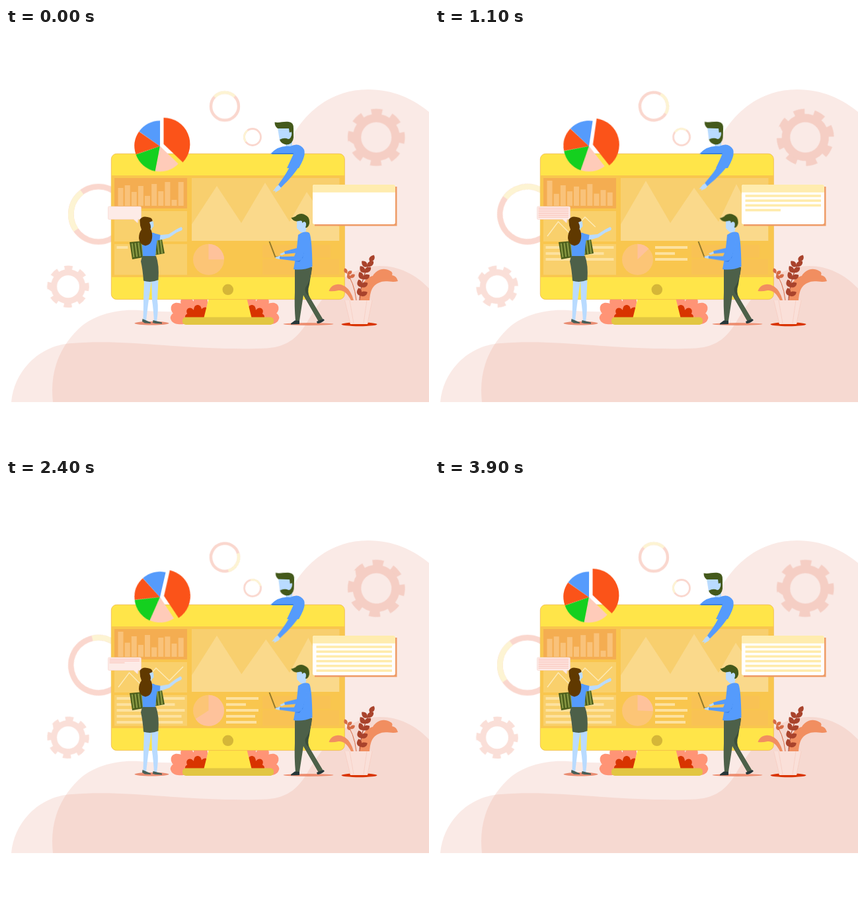
Recreate the animation shown at these times as an HTML page without scripts. Size 640 px wide and 640 px high, loop 4 s.

```html
<!DOCTYPE html>
<html lang="en">
<head>
<meta charset="utf-8">
<title>Dashboard team</title>
<style>
@property --t { syntax: "<number>"; inherits: true; initial-value: 0; }
html, body { margin: 0; width: 100%; height: 100%; overflow: hidden; background: #fff; }
svg { display: block; width: 100vw; height: 100vh; animation: clock 4s linear infinite; }
@keyframes clock { from { --t: 0; } to { --t: 4; } }

/* gears, rings and the pie swing out and back */
.turn { animation: turn 2s ease-in-out infinite alternate; }
.nod { animation: turn 1s ease-in-out infinite alternate; }
@keyframes turn { to { transform: rotate(var(--r)); } }
.tilt { animation: tilt 4s infinite; }
@keyframes tilt { 12%, 90% { transform: rotate(2deg); } }
.wave { animation: wave 2s ease-in-out infinite; }
@keyframes wave { 22% { transform: rotate(-4deg); } 50% { transform: none; } }

/* text lines grow from the left, starting at --s and lasting --d seconds */
.line rect {
  transform-box: fill-box; transform-origin: 0 50%;
  transform: scaleX(clamp(0, (var(--t) - var(--s)) / var(--d), 1));
}
.note { animation: clock2 2s linear infinite; }
@keyframes clock2 { from { --t: 0; } to { --t: 2; } }

.bars rect {
  y: 268px; width: 8px; height: 1px;
  transform-box: fill-box; transform-origin: 50% 100%;
  animation: bar 4s ease-in-out infinite;
}
@keyframes bar {
  0%, 100% { transform: scaleY(var(--a)); }
  25%, 75% { transform: scaleY(var(--b)); }
  50% { transform: scaleY(var(--c)); }
}
.hills { animation: hills 4s ease-in-out infinite; }
@keyframes hills {
  0%, 100% { d: path("M281 297L319 239L356 295L392 234L429 293L455 248L485 292L504 300V322H281Z"); }
  25% { d: path("M281 297L319 231L356 295L392 242L429 293L456 236L485 292L504 300V322H281Z"); }
  50% { d: path("M281 297L319 240L356 295L393 234L429 293L457 244L485 292L504 300V322H281Z"); }
  75% { d: path("M281 297L319 231L357 296L394 260L429 293L458 233L485 292L504 300V322H281Z"); }
}
.share { animation: share 4s ease-in-out infinite; }
@keyframes share {
  0%, 100% { stroke-dasharray: 90 360; }
  25% { stroke-dasharray: 42 360; }
  50% { stroke-dasharray: 250 360; }
  75% { stroke-dasharray: 212 360; }
}
.trend { stroke-dasharray: 1 2; animation: trend 4s infinite ease-in-out; }
@keyframes trend { 0% { stroke-dashoffset: 1; } 42%, 100% { stroke-dashoffset: 0; } }
</style>
</head>
<body>
<svg viewBox="0 0 640 640">
  <defs>
    <g id="gear" fill="none" stroke="currentColor">
      <circle r="29.3" stroke-width="12.6"/>
      <circle r="38.8" stroke-width="9" pathLength="360" stroke-dasharray="24 21" transform="rotate(-11)"/>
    </g>
    <path id="petal" d="M0 0C-9 -9 -12 -26 -5 -32Q0 -36 5 -32C12 -26 9 -9 0 0"/>
    <g id="bush">
      <g fill="#ff9476">
        <use href="#petal" transform="translate(286 441) rotate(-85) scale(1.05 1.1)"/>
        <use href="#petal" transform="translate(288 443) rotate(-58) scale(1.15 1.3)"/>
        <use href="#petal" transform="translate(290 441) rotate(-33) scale(1.1 1.2)"/>
        <use href="#petal" transform="translate(293 441) rotate(3) scale(1.2)"/>
      </g>
      <g fill="#d83400">
        <use href="#petal" transform="translate(288 441) rotate(-72) scale(.6 .52)"/>
        <use href="#petal" transform="translate(288 442) rotate(-36) scale(.65 .64)"/>
        <use href="#petal" transform="translate(290 442) scale(.68)"/>
        <use href="#petal" transform="translate(292 442) rotate(32) scale(.65)"/>
      </g>
    </g>
    <path id="sprig" d="M0 0C-2 -7 4 -9 9 -8C10 -3 6 1 0 0"/>
  </defs>

  <g fill="#e07c63" fill-opacity=".16">
    <path d="M71 566C67 530 74 490 110 455C132 434 168 425 200 427C290 434 350 430 378 340C400 265 405 210 434 162C460 118 500 93 548 93C585 93 616 107 640 127V566Z"/>
    <path d="M8 566C12 518 52 479 100 477C150 473 190 477 240 480C290 484 335 486 381 485C420 485 437 474 454 448C475 411 510 360 565 360C595 360 620 373 640 394V566Z"/>
  </g>

  <g transform="translate(560.3 165.5)" color="#f5cec4"><use href="#gear" class="turn" style="--r:52deg"/></g>
  <g transform="translate(94 391.2) scale(.735)" color="#fadfd8"><use href="#gear" class="turn" style="--r:52deg"/></g>

  <g fill="none" stroke="#fad7ce">
    <g transform="translate(140 281.7)"><g class="turn" style="--r:122deg" stroke-width="8.6">
      <circle r="41.7"/><circle r="41.7" stroke="#fdf4d3" pathLength="360" stroke-dasharray="88 360" transform="rotate(145)"/>
    </g></g>
    <g transform="translate(331 118.5)"><g class="turn" style="--r:131deg" stroke-width="4.4">
      <circle r="21"/><circle r="21" stroke="#fdf4d3" pathLength="360" stroke-dasharray="92 360" transform="rotate(-137)"/>
    </g></g>
    <g transform="translate(373 165)"><g class="turn" style="--r:122deg" stroke-width="2.8">
      <circle r="12.5"/><circle r="12.5" stroke="#fdf4d3" pathLength="360" stroke-dasharray="88 360" transform="rotate(145)"/>
    </g></g>
  </g>

  <!-- monitor -->
  <use href="#bush"/><use href="#bush" transform="translate(662) scale(-1 1)"/>
  <path fill="#ffe548" d="M307 408H364L372 440H299Z"/>
  <rect x="267" y="437.5" width="138" height="11.5" rx="5" fill="#e2c642"/>
  <rect x="159.3" y="190.3" width="353" height="220.3" rx="8" fill="#ffe549" stroke="#efb84a" stroke-width=".8"/>
  <path fill="#f9c64e" d="M160 223H512V377H160Z"/>
  <circle cx="335.8" cy="395.8" r="8.3" fill="#d5b638"/>

  <path fill="#f4ad51" d="M164 227h110v46H164Z"/>
  <g class="bars" fill="#f9c27a">
    <rect x="169.5" style="--a:27;--b:38;--c:38"/>
    <rect x="179.7" style="--a:31;--b:18;--c:23"/>
    <rect x="189.8" style="--a:21;--b:31;--c:31"/>
    <rect x="199.9" style="--a:30;--b:22;--c:16"/>
    <rect x="210" style="--a:15;--b:29;--c:35"/>
    <rect x="220.2" style="--a:33;--b:25;--c:9"/>
    <rect x="230.3" style="--a:22;--b:33;--c:27"/>
    <rect x="240.4" style="--a:36;--b:18;--c:37"/>
    <rect x="250.5" style="--a:9;--b:24;--c:18"/>
    <rect x="260.7" style="--a:36;--b:20;--c:33"/>
  </g>

  <path fill="#f9d06c" d="M164 277h110v46H164ZM164 327h110v46.500H164Z"/>
  <path class="trend" pathLength="1" fill="none" stroke="#fdebb8" stroke-width="1.4" d="M170 315L186.500 293L204 311L227 286L247 305L268 284"/>
  <path fill="#f8cf6e" d="M281 227h223.500v95H281Z"/>
  <path class="hills" fill="#fad98b"/>
  <path fill="#f9c158" d="M388 328h103v19.500H388ZM388 350h116v23H388Z" opacity=".7"/>

  <circle cx="306.500" cy="350.300" r="23.500" fill="#fcc576"/>
  <circle class="share" cx="306.500" cy="350.300" r="11.750" pathLength="360" fill="none" stroke="#fec29b" stroke-width="23.500" transform="rotate(-90 306.500 350.300)"/>

  <g class="line" fill="#fde2a0" style="--d:.25">
    <rect x="167.500" y="330" width="103" height="4" style="--s:-.04"/>
    <rect x="167.500" y="339.200" width="88" height="4" style="--s:.44"/>
    <rect x="167.500" y="348" width="103" height="4" style="--s:.83"/>
    <rect x="167.500" y="357" width="98" height="4" style="--s:1.25"/>
    <rect x="167.500" y="366" width="100" height="4" style="--s:1.63"/>
  </g>
  <g class="line" fill="#fde2a0" style="--d:.2">
    <rect x="333" y="330" width="49" height="4" style="--s:.14"/>
    <rect x="333" y="339.200" width="30" height="4" style="--s:.51"/>
    <rect x="333" y="348" width="49" height="4" style="--s:.88"/>
    <rect x="333" y="357" width="44" height="4" style="--s:1.25"/>
    <rect x="333" y="366" width="46" height="4" style="--s:1.62"/>
  </g>

  <!-- pie -->
  <g transform="translate(233 178.700)"><g class="turn" style="--r:14deg">
    <g fill="none" stroke-width="38.600">
      <circle r="19.300" pathLength="360" stroke="#ffcbb9" stroke-dasharray="57 360" transform="rotate(44)"/>
      <circle r="19.300" pathLength="360" stroke="#14d01f" stroke-dasharray="59.500 360" transform="rotate(101)"/>
      <circle r="19.300" pathLength="360" stroke="#fb5319" stroke-dasharray="53.500 360" transform="rotate(161)"/>
      <circle r="19.300" pathLength="360" stroke="#559bfc" stroke-dasharray="55 360" transform="rotate(215)"/>
    </g>
    <path fill="#fb5319" d="M5.500 -3V-43A40 40 0 0 1 34.500 24.500Z"/>
  </g></g>

  <!-- man leaning over the monitor -->
  <g class="tilt" style="transform-origin:426px 182px">
    <path fill="#b9dbff" d="M423 171H433V181H423ZM411 151L430 152L434 158Q436 164 431 169L414 170Z"/>
    <path fill="#44591b" d="M406.500 142.500C414 144 419 141 428 142Q435.500 143 435 152V166Q434 176 424 176.500Q416 175 414 169Q421 165 427 168Q430 168 431 164Q433 160 432 157L429 159L428 152H411Q406.500 149 406.500 142.500Z"/>
    <path fill="#b9dbff" d="M429 158q4 -1 3 4q-1 4 -3 5Z"/>
  </g>
  <path fill="#559bfc" d="M400 190.500Q412 177 430 179Q444 172 451 184Q454 193 443 212H425L435 190.500Z"/>
  <path fill="#2f76d6" d="M403 189.600H436V191H402Z"/>
  <g class="nod" style="--r:4.500deg;transform-origin:443px 188px">
    <path fill="#b9dbff" d="M415 236L409 240L404 247L408 246L407 249L414 245L418 239Z"/>
    <path fill="#559bfc" d="M435 188Q452 180 451.500 192C448 208 431 227 416 241.500L412 237C423 222 434 206 435 188Z"/>
  </g>

  <!-- note card -->
  <path fill="#ee9b66" d="M467 240H591.500V299.500H467Z"/>
  <rect x="464" y="237" width="125" height="60" rx="3" fill="#fff"/>
  <path fill="#ffecae" d="M464 248.700V240q0 -3 3 -3H586q3 0 3 3V248.700Z"/>
  <g class="line" fill="#ffebab" style="--d:.12">
    <rect x="469.500" y="252.200" width="114.500" height="3.600" style="--s:.22"/>
    <rect x="469.500" y="259.400" width="114.500" height="3.600" style="--s:.5"/>
    <rect x="469.500" y="266.600" width="114.500" height="3.600" style="--s:.77"/>
    <rect x="469.500" y="273.800" width="114.500" height="3.600" style="--s:1.045"/>
    <rect x="469.500" y="281" width="114.500" height="3.600" style="--s:1.33"/>
    <rect x="469.500" y="288.200" width="114.500" height="3.600" style="--s:1.61"/>
  </g>

  <!-- speech bubble -->
  <path fill="#fdebe7" stroke="#f6d3cb" stroke-width=".6" d="M156 270H203q1.500 0 1.500 1.500V288q0 1.500 -1.500 1.500H200L199 295L193 289.500H156q-1.500 0 -1.500 -1.500V271.500q0 -1.500 1.500 -1.500Z"/>
  <g class="line note" fill="#fac3b9" style="--d:.16">
    <rect x="156.500" y="272" width="45.500" height="1.200" style="--s:.02"/>
    <rect x="156.500" y="274.700" width="45.500" height="1.200" style="--s:.17"/>
    <rect x="156.500" y="277.400" width="45.500" height="1.200" style="--s:.32"/>
    <rect x="156.500" y="280.100" width="45.500" height="1.200" style="--s:.48"/>
    <rect x="156.500" y="282.800" width="45.500" height="1.200" style="--s:.64"/>
    <rect x="156.500" y="285.500" width="45.500" height="1.200" style="--s:.8"/>
  </g>

  <!-- woman -->
  <ellipse cx="220.500" cy="446.700" rx="26" ry="2.800" fill="#e98d72"/>
  <path fill="#b9dbff" d="M209 382H220L215 418L212 443H207.500Q208 425 208 412ZM220 382H230.500L229 412Q231 425 228 444H224Q223 425 221 412Z"/>
  <path fill="#465f58" d="M206.500 440L219 445.500V447L210 446.500L206 444ZM222.500 442L236 445.500V447.500L226 447L222 446Z"/>
  <path fill="#4d5f1c" d="M187 324L236 319.500L240 341L191 350Z"/>
  <path fill="none" stroke="#8b9b45" stroke-width="21" stroke-dasharray="2.200 2.600" d="M191 336.500L238 330.500"/>
  <g class="wave" style="transform-origin:230px 315px">
    <path fill="#b9dbff" d="M230 313.500L246 312L258 304.500L265 301Q268 303 266 306L258 309.500L247 317Q238 320 230 321Z"/>
    <path fill="#559bfc" d="M222 310L233.500 313L232.500 321L222 322Z"/>
  </g>
  <path fill="#559bfc" d="M205 314Q214 308 224 310L229 316L226 345H207Z"/>
  <path fill="#4d6049" d="M206 345H227Q232 358 230.500 381Q220 386 208 382.500Q207 366 204 353Z"/>
  <path fill="#b9dbff" d="M216 291L223 293L223.500 300L220 304L219 311H212Z"/>
  <path fill="#603900" d="M202.500 290Q206 284 214 286Q222 287 221.500 292L217 294Q220 300 218.500 304Q222 309 221 318Q220 328 211 329.500Q202 328 201 318Q201 310 205 305Q202 298 202.500 290Z"/>

  <!-- man with laptop -->
  <ellipse cx="457.500" cy="448" rx="38" ry="1.900" fill="#ed8f72"/>
  <path fill="#3d4f3b" d="M446 362H463L459 388Q455 400 460 408L479 440L473 444L451 406Q447 395 448 380Z"/>
  <path fill="#4d6049" d="M437 362H463Q462 380 453 393Q451 400 458 406L479 440L473 444L450 404L444 443H438Q436 420 437 400Z"/>
  <path fill="#26383a" d="M437 442.500L444 443V448L431 448.500V447ZM470 444L480 440L482 442Q477 447 471 447Z"/>
  <path fill="#b9dbff" d="M440 290L455 292V300L453 310L446 309L440 303Z"/>
  <path fill="#559bfc" d="M442 313Q452 306 459 310Q463 318 463.500 361Q450 367 435 365L439 343Z"/>
  <path fill="#3a82ea" d="M452 325Q453 343 444 354L437 353L449 348Z"/>
  <path fill="none" stroke="#91792b" stroke-width="2" d="M398.500 323L407.500 346.500H416"/>
  <g class="nod" style="--r:1.500deg;transform-origin:446px 340px">
    <path fill="#b9dbff" d="M414 342L422 338.500L424 341L417 344ZM407 347L415 344.500V350L409 349Z"/>
    <path fill="#559bfc" d="M421 338L440 333L445 314L456 317Q452 341 447 350Q444 353 437 352.500L414 349.500V346L436 345.500L438 340.500L422 342Z"/>
  </g>
  <g class="nod" style="--r:-2deg;transform-origin:449px 308px">
    <path fill="#44591b" d="M431.500 287Q438 286 440 283Q447 279 453 283Q460 286 459 296Q457 303 453 302Q456 294 451 293L448 295Q449 290 443 292Q435 294 431.500 287Z"/>
  </g>

  <!-- potted plant -->
  <ellipse cx="534.500" cy="448.300" rx="27" ry="2.900" fill="#d93400"/>
  <path fill="#f18e60" d="M488.500 398C492 387 504 385 513 391Q522 397 526 412H522Q514 396 503 397Q495 399 488.500 398ZM536 412C536 392 541 378 555 375C560 366 571 361 582 368C586 370 584 374 584 374Q591 375 593 383C582 386 574 380 563 386C552 391 551 403 550 412Z"/>
  <path fill="none" stroke="#a9432c" stroke-width="1.200" d="M535 412Q537 378 553 349"/>
  <g fill="#a9432c">
    <use href="#sprig" transform="translate(551 354) rotate(-20)"/>
    <use href="#sprig" transform="translate(547 361)"/><use href="#sprig" transform="translate(547 361) rotate(-95)"/>
    <use href="#sprig" transform="translate(543 370)"/><use href="#sprig" transform="translate(543 370) rotate(-85)"/>
    <use href="#sprig" transform="translate(540 380) rotate(10)"/><use href="#sprig" transform="translate(540 380) rotate(-75)"/>
    <use href="#sprig" transform="translate(537 392) rotate(10)"/><use href="#sprig" transform="translate(537 392) rotate(-65)"/>
    <use href="#sprig" transform="translate(536 405) rotate(15)"/><use href="#sprig" transform="translate(536 405) rotate(-60)"/>
  </g>
  <path fill="none" stroke="#d56a45" d="M530 412Q527 384 513 367"/>
  <g fill="#d56a45">
    <use href="#sprig" transform="translate(516 371) rotate(-75) scale(.7)"/>
    <use href="#sprig" transform="translate(517 373) scale(.7)"/>
    <use href="#sprig" transform="translate(521 380) rotate(-80) scale(.7)"/>
    <use href="#sprig" transform="translate(521 378) rotate(5) scale(.7)"/>
  </g>
  <path fill="#fae0d9" d="M512.500 412H554L547 448H521Z"/>
  <path fill="none" stroke="#f6cdc2" stroke-width=".8" d="M512.500 412L521 447M554 412L547 447M520 412L526 447M546 412L541 447"/>
</svg>
</body>
</html>
```
